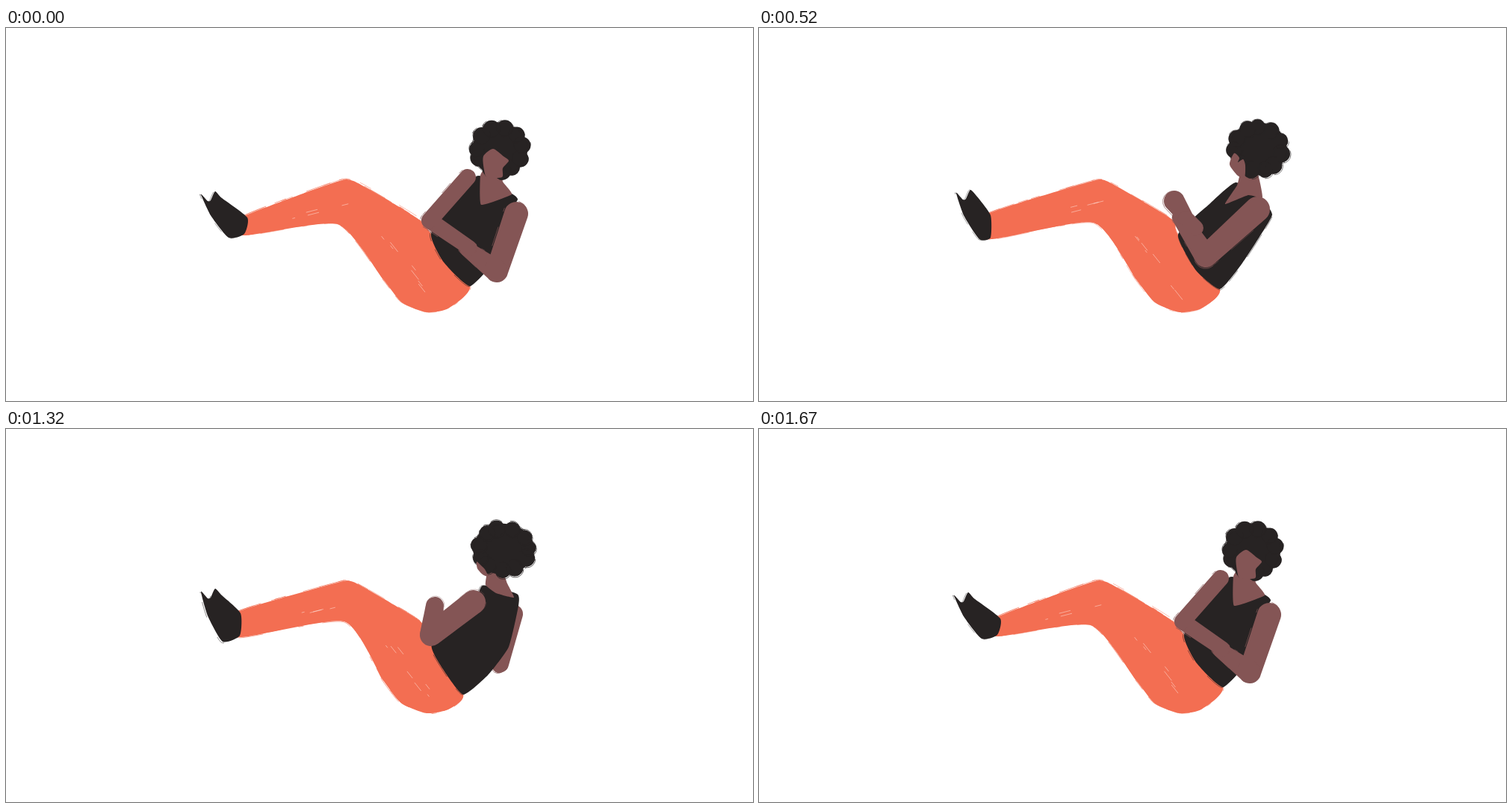
An HTML page with a canvas for the animation above (2000 ms loop, 1000 by 500 pixels).

```html
<!DOCTYPE html>
<html lang="en">
<head>
<meta charset="utf-8">
<title>Seated twist</title>
<style>
html, body { margin: 0; width: 100%; height: 100%; overflow: hidden; background: #fff; }
canvas { display: block; }
</style>
</head>
<body>
<canvas id="stage" width="1000" height="500"></canvas>
<script>
const ctx = document.getElementById('stage').getContext('2d');
const ORANGE = '#f36e52', SKIN = '#845555', BLACK = '#272323';

// Key points of each pose.
// leg: ankle front, ankle back, knee hollow; foot: toe, heel
// arms: shoulder, elbow, hand, each with a radius; hair: centre and radii
const front = pose({
  leg: '318,253 319,278 444,263', foot: '261,223 298,281',
  top: '633,198 603,222 569,276 586,314 621,346 655,310 672,250 685,230 677,222',
  armL: '618,200,11 567,258,11 621,295,10', armR: '683,249,16 657,326,15 617,296,10',
  neck: '643,186 635,198 636,237 677,223 665,206 664,188', hair: '661,163,42,40',
  face: '639,172 652,162 666,172 673,178 665,188 664,200 644,200 640,190'
});
const lean = pose({
  leg: '308,252 309,279 447,259', foot: '264,220 294,283',
  top: '632,195 603,222 569,280 590,317 620,349 645,320 662,270 684,230 678,226',
  armL: '617,203,11 561,258,11 602,286,11', armR: '675,252,16 648,330,15 598,287,12',
  neck: '640,186 633,197 629,240 680,227 666,208 660,190', hair: '661,164,39,36',
  face: '636,172 648,157 660,162 663,172 671,174 662,186 660,200 640,200'
});
const side = pose({
  leg: '305,250 310,283 448,261', foot: '264,221 295,283',
  top: '638,207 603,236 561,277 585,325 617,350 645,318 670,280 687,250 672,227',
  armL: '585,268,10 572,255,10 556,232,14', armR: '667,243,17 598,306,15 564,254,11',
  neck: '645,194 640,211 624,236 655,224 674,227 667,194', hair: '668,162,44,40',
  face: '636,168 643,174 641,180 648,176 651,184 650,200 641,198 630,183'
});
const rear = pose({
  leg: '303,245 312,276 460,263', foot: '264,220 294,283',
  top: '631,209 612,240 566,286 588,325 613,353 650,320 673,298 685,236 682,221',
  armL: '614,226,16 571,269,14 569,270,13', armR: '682,248,14 660,310,14 655,312,12',
  neck: '645,193 643,212 655,222 679,227 673,210 668,195', hair: '662,169,43,38', back: '1'
});
const rearTurn = pose({
  leg: '309,246 313,279 453,258', foot: '261,218 290,285',
  top: '638,210 625,240 570,288 585,322 612,356 645,330 673,292 686,237 684,221',
  armL: '626,232,16 569,276,15 574,237,12', armR: '679,248,13 662,315,11 660,318,9',
  neck: '645,192 642,209 656,220 680,226 671,207 666,195', hair: '666,161,46,39', back: '1',
  face: '630,178 633,180 637,184 641,188 645,196 645,198 638,195 631,187'
});
const frontTurn = pose({
  leg: '303,246 312,276 459,261', foot: '261,218 291,285',
  top: '630,199 603,225 567,276 588,320 622,346 640,325 652,290 666,240 678,224',
  armL: '615,209,10 563,256,10 594,279,13', armR: '673,246,15 640,326,14 595,281,12',
  neck: '641,184 633,199 625,243 672,224 661,203 660,188', hair: '665,164,38,37',
  face: '631,178 645,162 655,162 658,176 663,178 659,190 661,198 640,198'
});

// Six steps away from the front pose, six steps back to it
const POSES = [
  lean, mix(lean, side, 1 / 3), mix(lean, side, 2 / 3), side, mix(side, rearTurn, .7), rear,
  rearTurn, mix(rearTurn, side, .6), mix(side, frontTurn, .5), frontTurn, mix(frontTurn, front, .5), front
];

function pose(parts) {
  const parse = text => text.split(' ').map(p => p.split(',').map(Number));
  return Object.fromEntries(Object.entries({ back: '0', ...parts }).map(([k, v]) => [k, parse(v)]));
}

function mix(a, b, k) {
  if (typeof a === 'number') return a + (b - a) * k;
  if (Array.isArray(a)) return a.map((v, i) => mix(v, b[i], k));
  return Object.fromEntries(Object.keys(a).map(key => [key, mix(a[key], b[key], k)]));
}

function random(seed) {
  return () => (seed = (seed * 16807) % 2147483647) / 2147483647;
}

// Closed curve through the points; a higher stiffness gives sharper corners
function curve(pts, stiffness) {
  const path = new Path2D(), n = pts.length;
  path.moveTo(...pts[0]);
  for (let i = 0; i < n; i++) {
    const [a, b, c, d] = [n - 1, 0, 1, 2].map(o => pts[(i + o) % n]);
    path.bezierCurveTo(
      b[0] + (c[0] - a[0]) / stiffness, b[1] + (c[1] - a[1]) / stiffness,
      c[0] - (d[0] - b[0]) / stiffness, c[1] - (d[1] - b[1]) / stiffness, ...c);
  }
  path.closePath();
  return path;
}

// Chain of tapered capsules
function limb(joints) {
  const path = new Path2D();
  for (let i = 1; i < joints.length; i++) {
    const [ax, ay, ar] = joints[i - 1], [bx, by, br] = joints[i];
    const dir = Math.atan2(by - ay, bx - ax), q = Math.PI / 2;
    const part = new Path2D();
    part.arc(bx, by, br, dir - q, dir + q);
    part.arc(ax, ay, ar, dir + q, dir + 3 * q);
    part.closePath();
    path.addPath(part);
  }
  return path;
}

// Ellipse ringed with curls
function curls([[cx, cy, rx, ry]], rand) {
  const path = new Path2D(), count = 11, turn = rand();
  path.ellipse(cx, cy, rx * .88, ry * .88, 0, 0, 7);
  for (let i = 0; i < count; i++) {
    const angle = (i + turn + rand() * .3) / count * 2 * Math.PI;
    const x = cx + Math.cos(angle) * rx * .73, y = cy + Math.sin(angle) * ry * .73;
    const r = ry * (.25 + rand() * .05);
    path.moveTo(x + r, y);
    path.arc(x, y, r, 0, 7);
  }
  return path;
}

function legs({ leg: [ankle, calf, hollow], top }) {
  const waist = top[2], hem = top[4];
  return curve([ankle, [440, 207], [465, 205], [525, 239], [556, 259], waist, hem,
    [592, 376], [563, 381], [530, 368], [505, 337], hollow, calf], 10);
}

function shoes({ leg: [ankle, calf], foot: [toe, heel] }) {
  const near = (p, x, y) => [p[0] + x, p[1] + y];
  return curve([toe, near(toe, 9, 9), near(toe, 13, 8), near(toe, 19, -4), near(toe, 28, 5),
    near(ankle, 5, 1), near(calf, 0, -2), heel, near(mix(toe, heel, .5), -5, 0)], 10);
}

// Filled shape with loose brush lines around its edge
function paint(path, color, lines, rand) {
  ctx.fillStyle = ctx.strokeStyle = color;
  ctx.fill(path);
  for (let i = 0; i < lines; i++) {
    ctx.save();
    ctx.translate(rand() * 3 - 1.5, rand() * 3 - 1.5);
    ctx.lineWidth = .4 + rand() * .4;
    ctx.setLineDash([15 + rand() * 30, 8 + rand() * 20, 5 + rand() * 15, 20 + rand() * 30]);
    ctx.stroke(path);
    ctx.restore();
  }
}

// Dry-brush marks that follow the direction of a limb
function scratch(count, x, y, w, h, angle, rand) {
  ctx.strokeStyle = 'rgba(255,235,228,.7)';
  ctx.lineWidth = .7;
  ctx.beginPath();
  for (let i = 0; i < count; i++) {
    const along = rand(), len = 3 + rand() * 14;
    const px = x + w * along + rand() * 14, py = y + h * along - rand() * 14;
    ctx.moveTo(px, py);
    ctx.lineTo(px + Math.cos(angle) * len, py + Math.sin(angle) * len);
  }
  ctx.stroke();
}

function draw(p, seed) {
  const rand = random(seed * 7919 + 13);
  const armR = () => paint(limb(p.armR), SKIN, 1, rand);
  const behind = p.back[0][0] > .5;
  ctx.fillStyle = '#fff';
  ctx.fillRect(0, 0, 1000, 500);
  paint(legs(p), ORANGE, 3, rand);
  scratch(7, 500, 290, 60, 75, .9, rand);
  scratch(4, 370, 260, 80, -18, -.25, rand);
  if (behind) armR();
  paint(curve(p.top, 12), BLACK, 1, rand);
  if (!behind) armR();
  paint(limb(p.armL), SKIN, 1, rand);
  paint(curve(p.neck, 16), SKIN, 0, rand);
  paint(curls(p.hair, rand), BLACK, 2, rand);
  if (p.face) paint(curve(p.face, 8), SKIN, 0, rand);
  paint(shoes(p), BLACK, 1, random(seed));
}

function frame(now) {
  const t = now % 2000;
  const step = start => Math.min(5, Math.floor((t - start) / 70));
  const i = t < 310 ? 11 : t < 1320 ? step(310) : 6 + step(1320);
  const p = POSES[i];
  // The feet settle halfway through the rear hold
  draw(p === rear && t < 990 ? { ...p, foot: side.foot } : p, i + 1);
  requestAnimationFrame(frame);
}
frame(performance.now());
</script>
</body>
</html>
```
